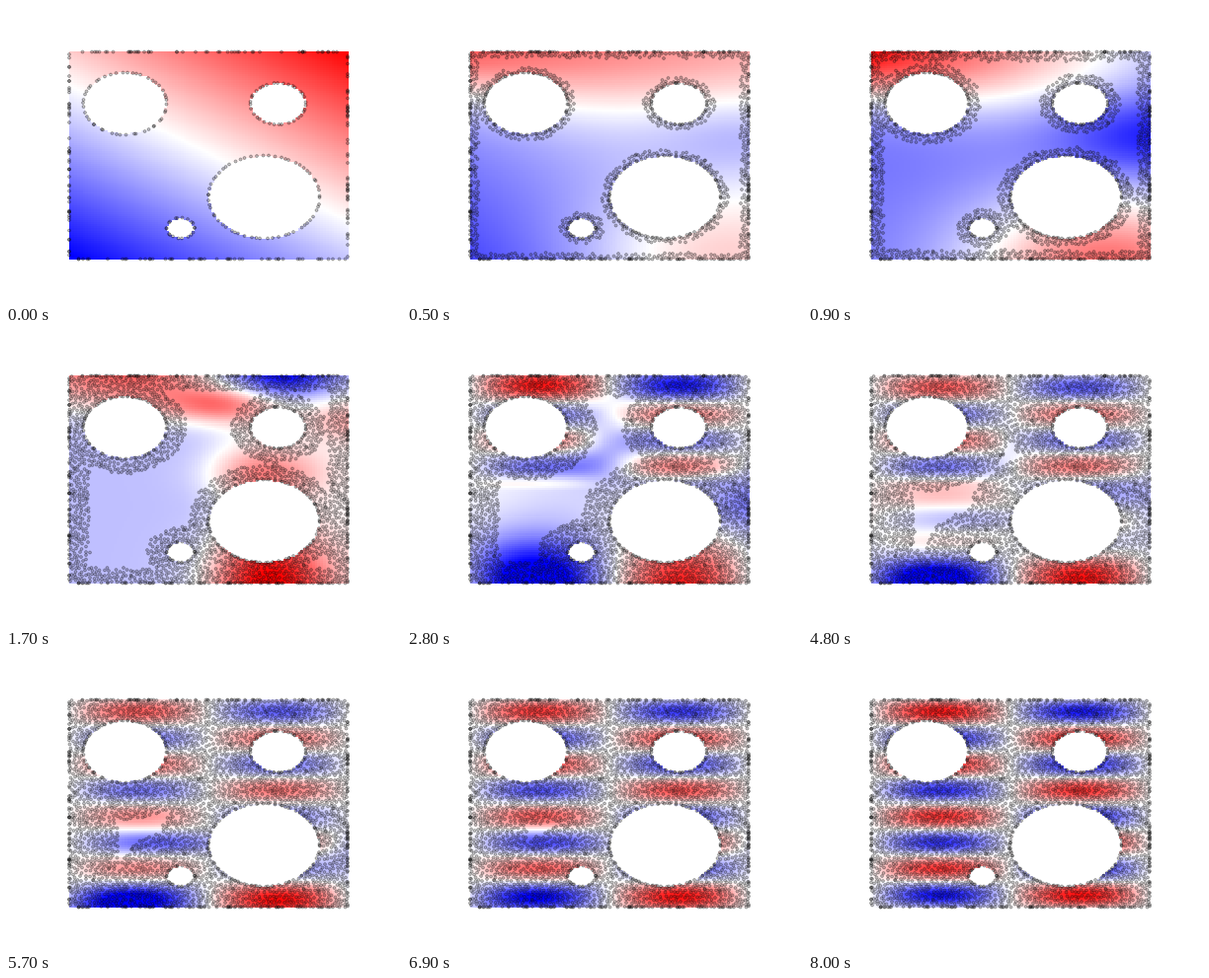
These frames come from a looping animation (400 by 300 pixels, 8.1 s). An HTML page with a canvas:

```html
<!DOCTYPE html>
<html lang="en">
<head>
<meta charset="utf-8">
<title>Adaptive field fit</title>
<style>
html, body { margin: 0; width: 100%; height: 100%; overflow: hidden; background: #fff; }
canvas { display: block; width: 400px; height: 300px; }
</style>
</head>
<body>
<canvas id="stage" width="400" height="300"></canvas>
<script>
const STEP = 100, STEPS = 81, N = 100;
const X0 = 64.1, Y0 = 46.5, W = 281.8, H = 210;
const TAU = 2 * Math.PI;

// Holes in unit coordinates, v pointing down: [u, v, radius]
const HOLES = [[.2, .25, .15], [.75, .25, .1], [.7, .7, .2], [.4, .85, .05]];

const ctx = document.getElementById('stage').getContext('2d');
const mesh = document.createElement('canvas');
mesh.width = mesh.height = N;
const meshCtx = mesh.getContext('2d');
const image = meshCtx.createImageData(N, N);

const clamp = (x, lo, hi) => Math.max(lo, Math.min(hi, x));
const mix = (a, b, k) => a + (b - a) * k;
const smooth = (a, b, x) => {
  const k = clamp((x - a) / (b - a), 0, 1);
  return k * k * (3 - 2 * k);
};
const bell = x => Math.exp(-x * x);

let seed = 20417;
function random() {
  seed = (seed + 0x6D2B79F5) | 0;
  let r = Math.imul(seed ^ seed >>> 15, 1 | seed);
  r = r + Math.imul(r ^ r >>> 7, 61 | r) ^ r;
  return ((r ^ r >>> 14) >>> 0) / 4294967296;
}

function holeGap(u, v) {
  return Math.min(...HOLES.map(([a, b, r]) => Math.hypot(u - a, v - b) - r));
}
const depth = (u, v) => Math.min(u, 1 - u, v, 1 - v, holeGap(u, v));

// Soft spot centred on (a, b)
const spot = (u, v, a, b, ru, rv) => bell((u - a) / ru) * bell((v - b) / rv);

// Wave bands with separate upper and lower strength, plus lobes at the top and bottom edges
function ripple(u, v, upper, lower, top, bottom, spread) {
  const bands = Math.sin(2 * TAU * 2 * v) * mix(upper, lower, smooth(.48, .56, v));
  const edges = top * bell(v / .1) - bottom * bell((1 - v) / spread);
  return Math.sin(TAU * u) * (bands + edges);
}

const start = (u, v) => .2 + .8 * u - 1.23 * v;

const early = (u, v) => -.55
  + (1.5 - 1.15 * u) * bell(v / (.23 + .15 * u))
  - .5 * spot(u, v, 1, .4, .35, .2)
  + 1.15 * spot(u, v, .85, 1.05, .5, .38);

const forming = (u, v) => -.25 * (1 - smooth(.4, .7, u))
  + .85 * spot(u, v, .2, 0, .4, .17)
  + .6 * spot(u, v, .52, .14, .2, .09)
  - 1.1 * spot(u, v, .75, 0, .22, .11)
  + .3 * spot(u, v, 1, .22, .15, .1)
  + .5 * spot(u, v, .7, .47, .2, .12)
  + 1.05 * spot(u, v, .72, 1, .22, .24);

const settling = (u, v) => ripple(u, v, .48, 0, .6, .9, .2)
  - .3 * spot(u, v, .48, .38, .12, .15)
  - .4 * spot(u, v, .15, .95, .35, .22)
  - .12 * spot(u, v, .35, .6, .25, .2)
  - .5 * spot(u, v, 1, .62, .2, .15);

const banding = (u, v) => ripple(u, v, .5, 0, .2, 1, .14)
  - .12 * spot(u, v, .5, .35, .06, .2)
  + .14 * spot(u, v, .2, .62, .35, .1)
  - .4 * spot(u, v, .1, .97, .35, .14)
  - .45 * spot(u, v, .97, .57, .2, .1);

const refining = (u, v) => ripple(u, v, .52, .42, .15, .75, .09)
  - .32 * spot(u, v, .48, .69, .25, .05)
  - .4 * spot(u, v, .08, 1, .25, .09)
  - .2 * spot(u, v, 1, .75, .1, .12);

const settled = (u, v) => ripple(u, v, .8, .8, .15, .2, .1);

const KEYS = [
  [0, start], [900, early], [1700, forming], [2800, settling],
  [4000, banding], [5700, refining], [8000, settled]
].map(([time, field]) => ({ time, cells: sample(field) }));

function sample(f) {
  return Float32Array.from({ length: N * N }, (_, i) =>
    f((i % N + .5) / N, (Math.floor(i / N) + .5) / N));
}
const solid = sample((u, v) => holeGap(u, v) > -.003 ? 255 : 0);

// Depth reached by the sampled zone
const reachAt = time => .048 * (time / 1000) ** .75;

function makeDots() {
  const list = [];
  const add = (u, v, at) => list.push({
    x: Math.round((X0 + u * W) * 2) / 2,
    y: Math.round((Y0 + v * H) * 2) / 2,
    at
  });

  for (let i = 0; i < 50; i++) {
    for (const side of [0, 1]) {
      add(random(), side, 0);
      add(side, random(), 0);
    }
  }
  for (const [u, v, r] of HOLES) {
    const count = Math.round(20 + 270 * (r - .05));
    for (let i = 0; i < count; i++) {
      const a = TAU * (i + random()) / count;
      add(u + r * Math.cos(a), v + r * Math.sin(a), 0);
    }
  }

  // Random fill that keeps a minimum spacing
  const gap = 2.9, taken = new Map();
  const key = (i, j) => i * 1000 + j;
  for (let n = 0; n < 40000; n++) {
    const u = random(), v = random(), d = depth(u, v);
    if (d < 0) continue;
    const x = u * W, y = v * H;
    const i = Math.floor(x / gap), j = Math.floor(y / gap);
    let free = true;
    for (let a = i - 1; a <= i + 1 && free; a++) {
      for (let b = j - 1; b <= j + 1 && free; b++) {
        const p = taken.get(key(a, b));
        if (p && Math.hypot(p[0] - x, p[1] - y) < gap) free = false;
      }
    }
    if (!free) continue;
    taken.set(key(i, j), [x, y]);
    add(u, v, Math.max(.001, d + (random() - .5) * .007));
  }
  return list;
}
const dots = makeDots();

function drawField(time) {
  let i = 0;
  while (i < KEYS.length - 2 && time >= KEYS[i + 1].time) i++;
  const a = KEYS[i], b = KEYS[i + 1];
  const k = (time - a.time) / (b.time - a.time);

  for (let c = 0; c < N * N; c++) {
    const value = clamp(mix(a.cells[c], b.cells[c], k), -1, 1);
    const low = 255 * (1 - Math.abs(value));
    const rgba = value > 0 ? [255, low, low, solid[c]] : [low, low, 255, solid[c]];
    image.data.set(rgba, c * 4);
  }
  meshCtx.putImageData(image, 0, 0);
  ctx.imageSmoothingEnabled = false;
  ctx.drawImage(mesh, X0 - .6, Y0 - .6, W + 1.2, H + 1.2);
}

function drawDots(reach) {
  ctx.lineWidth = 1;
  ctx.fillStyle = 'rgba(40,40,40,.28)';
  ctx.strokeStyle = 'rgba(0,0,0,.28)';
  for (const dot of dots) {
    if (dot.at > reach) continue;
    ctx.beginPath();
    ctx.arc(dot.x, dot.y, 1.5, 0, TAU);
    ctx.fill();
    ctx.stroke();
  }
}

function draw(time) {
  ctx.fillStyle = '#fff';
  ctx.fillRect(0, 0, 400, 300);
  drawField(time);
  drawDots(reachAt(time));
}

const began = performance.now();
let shown = -1;
function tick() {
  const step = Math.floor((performance.now() - began) / STEP) % STEPS;
  if (step !== shown) {
    shown = step;
    draw(step * STEP);
  }
  requestAnimationFrame(tick);
}
tick();
</script>
</body>
</html>
```
